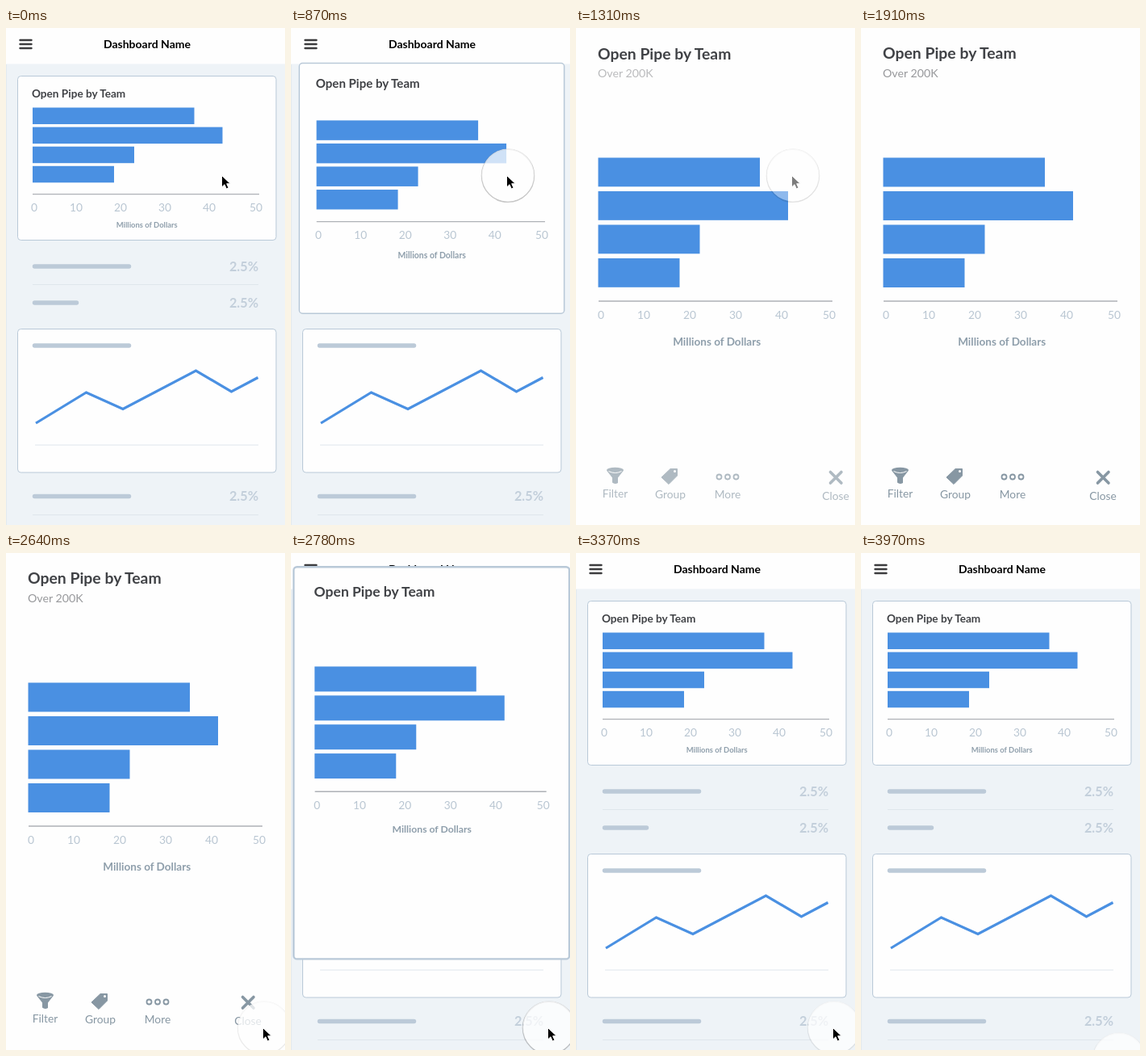
An HTML page for the animation above (4.43 s loop, 346 px wide and 615 px high).

```html
<!DOCTYPE html>
<html lang="en">
<head>
<meta charset="utf-8">
<title>Dashboard card</title>
<style>
  html, body { margin: 0; width: 100%; height: 100%; overflow: hidden; background: #eef3f7; }
  svg { display: block; font: 13.8px Lato, "Open Sans", sans-serif; }
  .bold { font-weight: 700; }
  .mid { text-anchor: middle; }
  .row { stroke: #bccad8; stroke-width: 5.5; stroke-linecap: round; }
  .rule { stroke: #dfe6ec; }
  .value { font-size: 16.3px; font-weight: 700; fill: #c3cfdb; text-anchor: end; }
  .card { fill: #fefefe; stroke: #b9c9d8; }
  .tools { fill: #8797a3; }
  .tools .line { fill: none; stroke: #8797a3; }
</style>
</head>
<body>
<svg width="346" height="615" viewBox="0 0 346 615">
  <rect width="346" height="615" fill="#eef3f7"/>
  <path d="M.5 45V615" stroke="#e3eaf0"/>
  <rect width="346" height="44.5" fill="#fefefe"/>
  <path d="M17.5 15H31.5M17.5 20H31.5M17.5 25H31.5" stroke="#3c3c3e" stroke-width="2.4" stroke-linecap="round"/>
  <text class="bold mid" x="175" y="24.5" font-size="14">Dashboard Name</text>

  <path class="row" d="M35.5 295H152.5M35.5 340H87.5M35.5 579.5H152.5"/>
  <path class="rule" d="M33 317.5H313M33 602.5H313"/>
  <text class="value" x="313" y="300.5">2.5%</text>
  <text class="value" x="313" y="345.5">2.5%</text>
  <text class="value" x="313" y="585">2.5%</text>

  <rect class="card" x="14.5" y="372.5" width="320.5" height="177.5" rx="4"/>
  <path class="row" d="M35.5 393H152.5"/>
  <path class="rule" d="M36 516H313"/>
  <path d="M37 489L99.500 451L145 471.500L235.500 424L279.500 450L312.500 432.500" fill="none" stroke="#4a90e2" stroke-width="3.2"/>

  <rect id="card" class="card" rx="4"/>
  <text id="title" class="bold" fill="#404246">Open Pipe by Team</text>
  <g id="bars" fill="#4a90e2"></g>
  <path id="axis" stroke="#aeb1b6"/>
  <g id="ticks" class="mid" fill="#b9c6d2"></g>
  <text id="unit" class="bold mid" x="174.700" fill="#8e9eab">Millions of Dollars</text>

  <g id="tools" class="tools">
    <text x="27" y="61" font-size="14.2" fill="#98999c">Over 200K</text>
    <path d="M38 547.500L45 556.500V562.500Q48 565 52 563V556.500L59 547.500Z"/>
    <ellipse cx="48.500" cy="547" rx="10.500" ry="3.200"/>
    <path d="M40.500 548.500Q48.500 552.500 56.500 548.500" fill="none" stroke="#fefefe"/>
    <path d="M106 556L117 545.500H125.500V554L115 564.500Z" stroke="#8797a3" stroke-linejoin="round"/>
    <circle cx="122.500" cy="548.500" r="1.500" fill="#fefefe"/>
    <g class="line" stroke-width="1.800">
      <circle cx="177.500" cy="555.500" r="3"/><circle cx="188" cy="555.500" r="3"/><circle cx="198.500" cy="555.500" r="3"/>
    </g>
    <g class="mid">
      <text x="48.500" y="581">Filter</text>
      <text x="117" y="582">Group</text>
      <text x="188" y="582">More</text>
      <g id="close">
        <path class="line" d="M293.500 549.500L307 563M307 549.500L293.500 563" stroke-width="3.600" stroke-linecap="round"/>
        <text x="300" y="583.500">Close</text>
      </g>
    </g>
  </g>

  <g id="pointer">
    <g id="touch">
      <circle id="shadow" cy=".8" r="32.500" fill="none" stroke="#000" stroke-width="1.600"/>
      <circle r="32.500" fill="#fff" fill-opacity=".74"/>
    </g>
    <path d="M-1.500 .5V15L2 11.700L4.300 17L7 15.800L4.700 10.700H9.300Z" stroke="#fff" stroke-width="1"/>
  </g>
</svg>
<script>
  const LOOP = 4430, STEP = 147.6, FIRST = 870;
  const $ = id => document.getElementById(id);
  const mix = (a, b, k) => a + (b - a) * k;
  const clamp = x => Math.max(0, Math.min(1, x));
  const set = (el, attrs) => { for (const k in attrs) el.setAttribute(k, attrs[k]); };
  const add = (parent, tag) =>
    parent.appendChild(document.createElementNS("http://www.w3.org/2000/svg", tag));

  const inOut = u => (u = clamp(u)) < .5 ? 4 * u ** 3 : 1 - 4 * (1 - u) ** 3;
  // Same start as inOut, but with a long settling tail
  const settle = u => Math.min(inOut(u), 1 - Math.exp(-2.75 * Math.max(0, u)));
  const opened = (ease, t) => ease((t - 724) / 365) - ease((t - 2631) / 365);

  const bars = [200.5, 235.5, 126, 101].map(width => {
    const bar = add($("bars"), "rect");
    set(bar, { width });
    return bar;
  });
  const ticks = [[35, 31], [87, 84], [142, 141], [197, 198], [252, 255], [310, 314]].map(([from, to], i) => {
    const el = add($("ticks"), "text");
    el.textContent = i * 10;
    return { el, from, to };
  });

  function drawCard(t) {
    const p = opened(inOut, t), q = opened(settle, t);
    const x = mix(14.5, -2, p), y = mix(59.5, -3, p);
    set($("card"), {
      x, y, width: mix(335, 350, p) - x, height: mix(262.5, 617, p) - y,
      "stroke-width": mix(1, 3, p)
    });
    set($("title"), { x: mix(32, 27, q), y: mix(86, 38, q), "font-size": mix(13.6, 19.4, q) });
    bars.forEach((bar, i) => set(bar, {
      x: mix(33, 27.5, p),
      y: mix(98.5, 160.5, p) + i * mix(24.1, 41.5, p),
      height: mix(20.5, 36, q)
    }));
    set($("axis"), {
      d: `M${mix(33, 28, p)} ${mix(205.7, 338, p)}H${mix(314, 318, p)}`,
      "stroke-width": mix(1.2, 1.7, p)
    });
    for (const { el, from, to } of ticks) set(el, { x: mix(from, to, p), y: mix(227, 360, p) });
    set($("unit"), { y: mix(247.3, 393, p), "font-size": mix(9.45, 13.55, p) });

    const shown = t < 2700 ? clamp((t - 1020) / 440) : 0;
    set($("tools"), { opacity: shown });
    set($("close"), { transform: `translate(${t < 1400 ? 22 : 0})` });
  }

  function drawPointer(t) {
    const first = t < 1800;
    const enter = inOut((t - 2198) / 443), leave = inOut((t - 3379) / 591);
    const x = first ? 269 : mix(315, 320, enter);
    const y = first ? 182 : mix(609, 587, enter) + 39 * leave;
    const pressed = first || (t > 2700 && t < 3000);
    set($("pointer"), {
      transform: `translate(${x} ${y})`,
      opacity: first ? clamp((1460 - t) / 290) : +(t > 2190)
    });
    set($("touch"), { opacity: +(t >= FIRST) });
    set($("shadow"), { "stroke-opacity": pressed ? .22 : .08 });
  }

  function frame(now) {
    // The motion advances in held steps
    const t = FIRST + Math.floor((now % LOOP - FIRST + 12) / STEP) * STEP;
    drawCard(t);
    drawPointer(t);
    requestAnimationFrame(frame);
  }
  frame(0);
</script>
</body>
</html>
```
